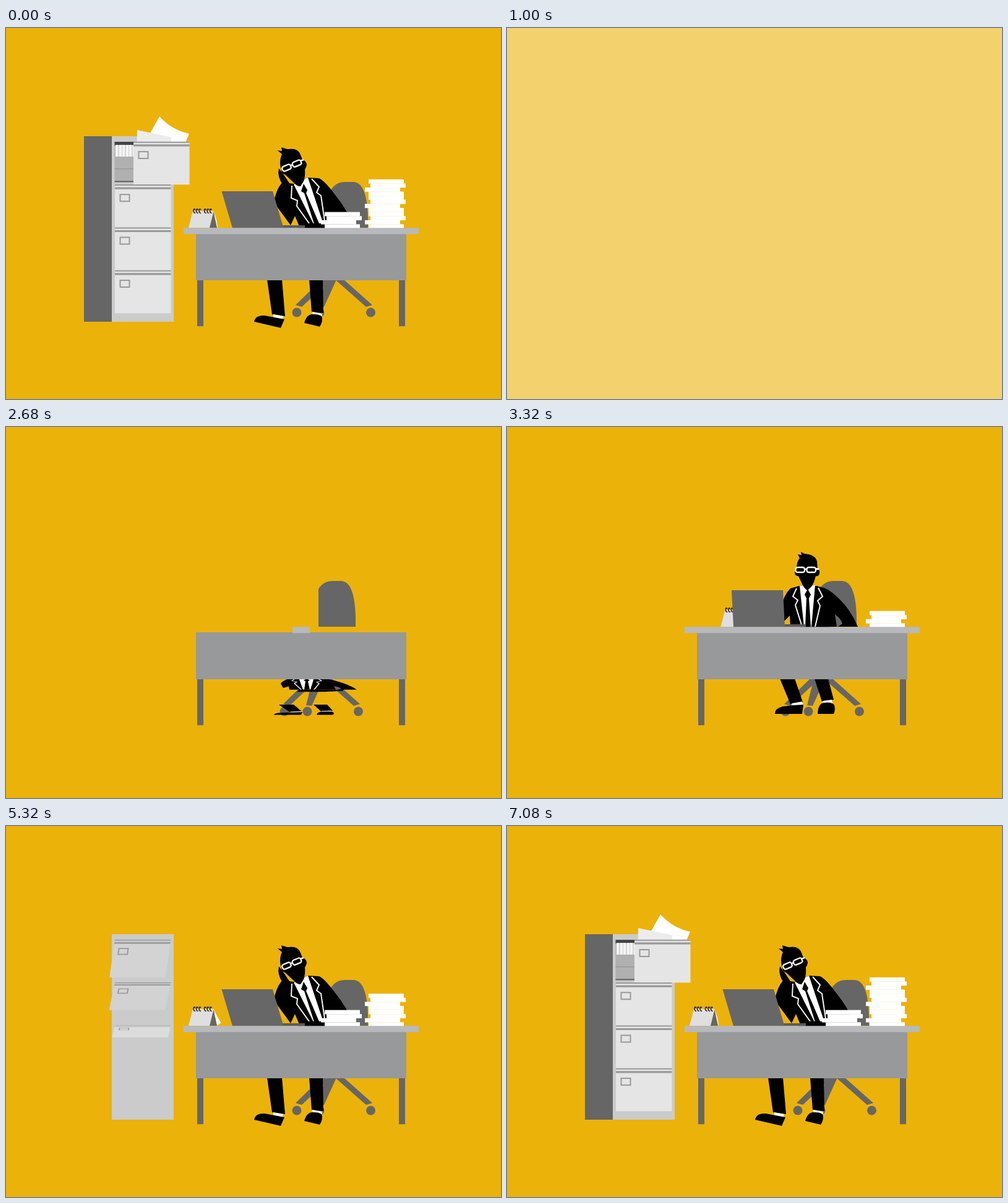
These frames come from a looping animation (800x600 px, 7.24 s). An HTML page with a canvas:

```html
<!DOCTYPE html>
<html lang="en">
<head>
<meta charset="utf-8">
<title>Office desk</title>
<style>
html, body { margin: 0; width: 100%; height: 100%; overflow: hidden; background: #ebb20a; }
canvas { display: block; width: 800px; height: 600px; }
</style>
</head>
<body>
<canvas width="800" height="600"></canvas>
<script>
const ctx = document.querySelector('canvas').getContext('2d');
const LOOP = 7240, STEP = 40;
const YELLOW = '#ebb20a', DARK = '#666', BLACK = '#000', WHITE = '#fff', LINE = '#999';

const span = (t, start, length) => Math.min(1, Math.max(0, (t - start) / length));
const smooth = p => p * p * (3 - 2 * p);
const back = (p, c) => 1 + (c + 1) * (p - 1) ** 3 + c * (p - 1) ** 2;

// Blends two path strings that share the same commands.
function mix(a, b, k) {
  const ends = b.match(/-?[\d.]+/g);
  let i = 0;
  return a.replace(/-?[\d.]+/g, v => +v + (ends[i++] - v) * k);
}
function fill(color, path) {
  ctx.fillStyle = color;
  ctx.fill(new Path2D(path));
}
function line(color, width, path) {
  ctx.strokeStyle = color;
  ctx.lineWidth = width;
  ctx.stroke(new Path2D(path));
}
function box(color, x, y, w, h) {
  ctx.fillStyle = color;
  ctx.fillRect(x, y, w, h);
}
function disc(color, x, y, r) {
  ctx.fillStyle = color;
  ctx.beginPath();
  ctx.arc(x, y, r, 0, 7);
  ctx.fill();
}
// Draws with a scale around the point x, y.
function scaled(x, y, sx, sy, draw) {
  if (sx <= 0 || sy <= 0) return;
  ctx.save();
  ctx.translate(x, y);
  ctx.scale(sx, sy);
  ctx.translate(-x, -y);
  draw();
  ctx.restore();
}
function moved(x, y, draw) {
  ctx.save();
  ctx.translate(x, y);
  draw();
  ctx.restore();
}

function chair() {
  fill(DARK, 'M505 262Q513 249 528 249H541Q564 249 565 310V323H505Z');
  fill(DARK, 'M490 407H505L458 451L448 448ZM496 407H514L494 451L485 450ZM512 407H526L572 448L562 451Z');
  for (const x of [450, 487, 569.5]) disc(DARK, x, 460, 7.5);
}

// Upright pose, leaning pose.
const BODY = [
  [BLACK, 'M441 407L465 407L478 445L458 448Z', 'M422 407L446 407L451 466L430 463Z'],
  [WHITE, 'M460 447L477 444L479 450L461 452Z', 'M432 463L448 466L446 473L432 470Z'],
  [BLACK, 'M433 464Q433 455 445 452L462 450L479 449L477 464Z', 'M401 475Q403 464 418 465L434 468L450 471L444 485Z'],
  [BLACK, 'M497 407L519 407L528 441L509 444Z', 'M490 407L512 407L513 461L494 459Z'],
  [WHITE, 'M510 443L525 441L526 447L511 448Z', 'M495 459L511 462L511 466L496 464Z'],
  [BLACK, 'M502 464Q503 447 512 446Q526 444 529 450Q531 457 528 464Z', 'M482 477Q486 463 495 463Q512 462 511 471Q511 477 507 483Z'],
  [BLACK, 'M472 257L458 261Q447 272 444 290L448 314L457 305L458 323L533 323L530 303Q540 310 542 318L535 323L567 323Q555 295 537 278Q523 264 512 260L500 257Z',
    'M466 252L446 250Q436 262 433 282L460 319L467 304L475 323L540 323L540 323Q540 323 540 323L545 323L564 323Q550 292 532 270Q515 247 506 243L488 242Z'],
  [BLACK, 'M458 264Q452 275 458 290L465 290L462 270Z', 'M441 227Q438 240 447 253L460 254L448 236Z'],
  [WHITE, 'M473 257L498 256L492 323L480 323Z', 'M465 253L488 242L515 323L500 323Z'],
  [BLACK, 'M486 262L481 271L484 277L482 323L491 323L488 277L491 271Z', 'M481 252L477 264L482 267L500 323L509 323L485 267L487 262Z'],
  [BLACK, 'M473 212L470 206L476 207L475 202L481 205Q498 206 501 217L502 230Q506 231 505 237Q504 242 499 241Q497 250 493 257L486 264Q482 263 478 256L471 241Q465 241 465 235Q466 230 468 229Q468 218 473 212Z',
    'M446 204L439 198L446 199L445 193L455 196Q472 193 476 205L479 213Q486 215 486 222Q484 228 483 228Q484 240 481 248L476 256Q470 256 465 250L451 237Q445 235 445 229Q443 223 443 219Q443 210 446 204Z']
];
const LAPELS = [
  ['M468 261L462 274L470 280L466 288L477 323', 'M462 255L461 275L471 279L470 288L490 316'],
  ['M503 260L510 274L502 281L506 289L498 323', 'M494 244L506 257L502 266L509 271L515 312']
];

function man(t, pose) {
  for (const [color, upright, lean] of BODY) fill(color, mix(upright, lean, pose));
  for (const [upright, lean] of LAPELS) line(WHITE, 1.9, mix(upright, lean, pose));

  const lift = 8 * Math.sin(Math.PI * span(t, 5800, 320));
  moved(0, 7 * (1 - pose) - lift, () => fill(BLACK, 'M474 316H518L545 318V323L515 328H470Z'));

  ctx.save();
  ctx.translate(483 - 21 * pose, 231 - 8.5 * pose);
  ctx.rotate(-0.4 * pose);
  ctx.strokeStyle = WHITE;
  ctx.lineWidth = 2.3;
  ctx.beginPath();
  ctx.roundRect(-16.5, -4, 14.5, 8, 3);
  ctx.roundRect(1.5, -4, 14.5, 8, 3);
  ctx.moveTo(-2, -1);
  ctx.lineTo(1.5, -1);
  ctx.moveTo(16, -2);
  ctx.lineTo(21, -1);
  ctx.stroke();
  ctx.restore();
}

function deskBody() {
  box(DARK, 309, 406, 10, 76.3);
  box(DARK, 635, 406, 10, 76.3);
  box('#98999b', 307, 332, 340, 76);
}

function calendar(t) {
  const swing = Math.sin(Math.PI * span(t, 4380, 2660));
  fill(WHITE, `M335 296Q340 306 ${342 + 6 * swing} ${322 - 4 * swing}L341 323Z`);
  fill('#dfdfe0', 'M302 296H336L330 323H295Z');
  fill(DARK, 'M335.5 297L341 323H329Z');
  for (const x of [303, 307.5, 312, 320.5, 325, 329.5])
    line('#222', 1.6, `M${x + 3} 294Q${x} 291 ${x} 296Q${x + 1} 300 ${x + 3} 299`);
}

function book(x, i, rise = 0) {
  box(WHITE, x + [0, -6, 3, 0][i % 4], 324 - 6.6 * (i + 1) - rise, 57, 6.8);
}

function rightPile(t, replay) {
  for (let i = 0; i < 12; i++) {
    let start = [2880, 3600, 5360][i >> 2] + 80 * (i % 4), now = t;
    if (i === 11 && replay >= 40) [start, now] = [40, replay];
    if (now >= start) book(586, i, 108 * (1 - span(now, start, 160) ** 2));
  }
}

function drawerFace(shade) {
  const face = `rgb(${shade},${shade - 1},${shade})`;
  box(face, 176, 0, 90.5, 69.5);
  box(LINE, 176, 0, 90.5, 2);
  box(LINE, 176, 4.5, 90.5, 3.2);
  ctx.strokeStyle = LINE;
  ctx.lineWidth = 2;
  ctx.strokeRect(184.5, 16.2, 15, 11);
}

function drawerInside() {
  box('#b0b0b0', 175.5, 184, 40, 65);
  box('#444', 175.5, 184, 40, 6);
  for (let x = 177; x < 212; x += 5.5) {
    box('#f4f4f4', x, 189, 4.5, 19);
    box('#d0d0d0', x + 4.5, 189, 1, 19);
  }
  box(LINE, 175.5, 227, 40, 1.5);
  box('#555', 175.5, 247.5, 40, 1.8);
}

function cabinet(t) {
  const side = 45 * smooth(span(t, 5720, 480));
  box(DARK, 171 - side, 175, side, 300);
  scaled(171, 475, 1, t > 4120 ? back(span(t, 4120, 640), 0.9) : 0, () => box('#cbcbcb', 171, 175, 100, 300));

  const slide = 30 * smooth(span(t, 5720, 560));
  if (slide > 0) {
    drawerInside();
    const rise = 45 * (1 - span(t, 6160, 280)) ** 2;
    if (t > 6160) {
      ctx.save();
      ctx.beginPath();
      ctx.rect(200, 100, 110, 86);
      ctx.clip();
      ctx.translate(0, rise);
      fill(WHITE, 'M248 143Q268 165 296 171L288 190H222Z');
      fill('#ececec', 'M212 165L267 176.5V240H210Z');
      ctx.restore();
    }
  }
  for (let i = 0; i < 4; i++) {
    const p = span(t, 4800 + 200 * i, 800);
    if (!p) continue;
    const bend = Math.sin(Math.PI * p);
    ctx.save();
    ctx.translate(i ? 0 : slide, 183.8 + 69.3 * i);
    ctx.transform(1, 0, -0.14 * bend, 1 - (1 - p) ** 2, 0, 0);
    drawerFace(Math.round(230 - 20 * bend));
    ctx.restore();
  }
}

function envelope(x, y) {
  moved(x, y, () => {
    fill(WHITE, 'M-25 -7L-3 -27H3L25 -7Z');
    box('#efeeef', -25, -7, 50, 35);
    box('#c9c9c9', -25, -7, 50, 5);
    fill('#c9c9c9', 'M-25 -2L-19 -2L-14 2ZM25 -2L19 -2L14 2Z');
    fill('#c80000', 'M-20 -2H20L0 14Z');
    fill(WHITE, 'M-25 28L-4 9Q0 6 4 9L25 28Z');
  });
}

function mail(t) {
  if (t <= 5760 || t >= 7080) return;
  const p = span(t, 6460, 600);
  envelope(390, 204 + 92 * (1 - span(t, 5760, 200)) ** 2 - 240 * p * p);
  if (p > 0) for (const x of [185, 527]) {
    const q = p * (2 - p);
    envelope(390 + (x - 390) * q, 292 - 330 * p);
  }
}

function laptop(t, pose) {
  scaled(366, 323, 1, t > 2920 ? back(span(t, 2920, 320), 1) : 0, () => {
    box('#5b5b5b', 440, 319, 43, 4.5);
    fill('#676767', mix('M363 264L446 264L449 323.5L366 323.5Z', 'M348.5 264L431 264L448.5 323.5L366 323.5Z', pose));
  });
}

function scene(t, replay) {
  const pose = smooth(span(t, 3640, 680));
  cabinet(t);
  if (t >= 1919) {
    const p = span(t, 1919, 560);
    moved(20 * pose, 0, () => scaled(506, 472, 0.84 + 0.16 * p, back(p, 2.8), chair));
  }
  if (t > 2640) scaled(485, 466, 1, back(span(t, 2640, 500), 1), () => man(t, pose));
  if (t > 2160) scaled(477, 482.3, 1, back(span(t, 2160, 480), 1.7), deskBody);
  mail(t);
  if (t > 3160) moved(72 * (1 - smooth(span(t, 3160, 440))), 0, () => calendar(t));
  laptop(t, pose);
  scaled(542, 324, 1, span(t, 4506, 200), () => {
    for (let i = 0; i < 4; i++) book(515, i);
  });
  rightPile(t, replay);
  const top = 380 * smooth(span(t, 2640, 240));
  box('#b8b9bc', 477 - top / 2, 323.3, top, 10);
}

function render(now) {
  const t = Math.floor(now % LOOP / STEP) * STEP;
  const ending = t < 860;
  box(YELLOW, 0, 0, 800, 600);
  scene(ending ? 7200 : t, ending ? t : -1);
  const veil = ending ? span(t, 360, 440) : 1 - span(t, 880, 200);
  box(`rgba(255,255,255,${veil})`, 0, 0, 800, 600);
}

let begin;
function tick(now) {
  begin ??= now;
  render(now - begin);
  requestAnimationFrame(tick);
}
render(0);
requestAnimationFrame(tick);
</script>
</body>
</html>
```
